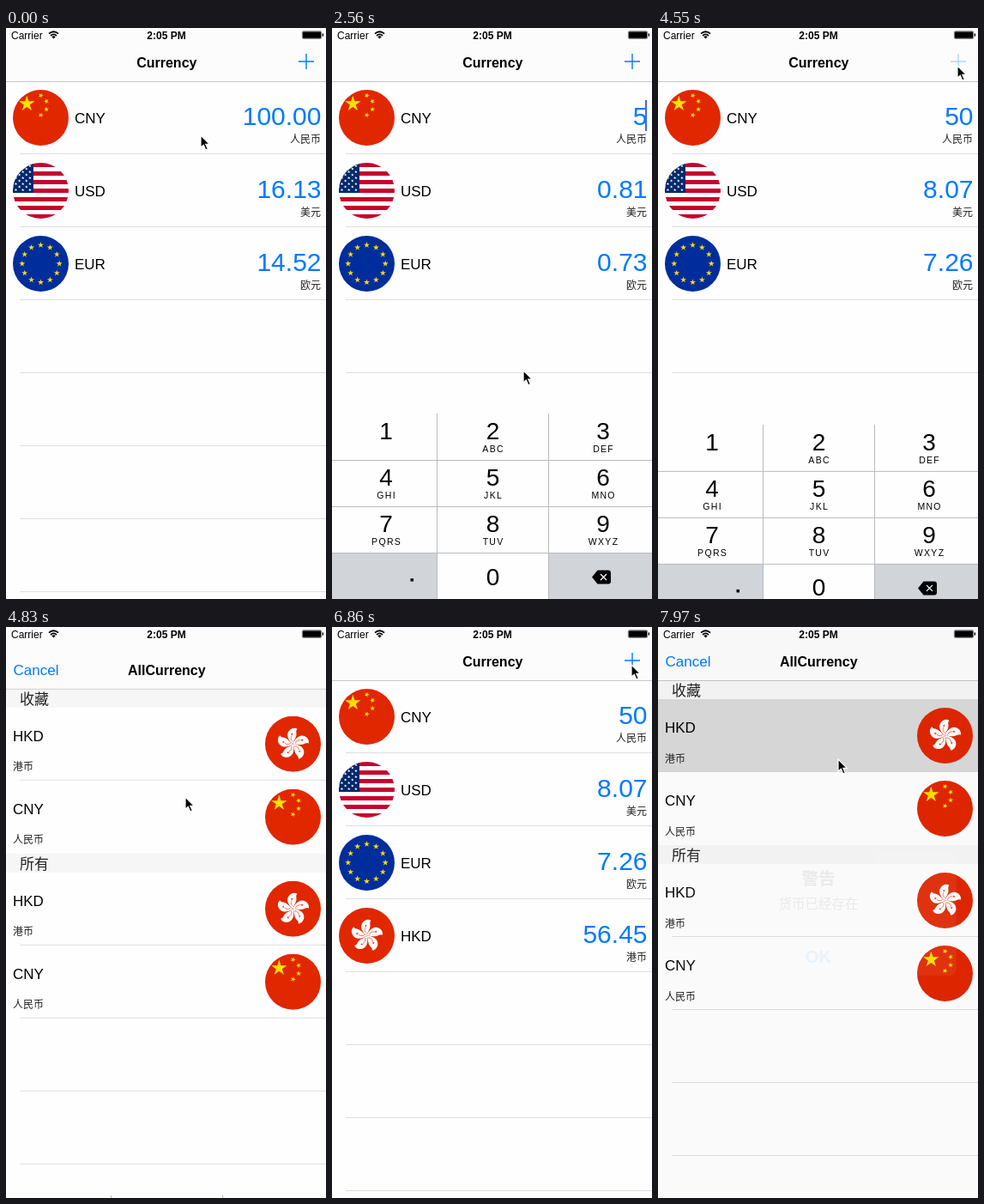
Write an HTML page that moves like this. It is 373 px wide and 665 px high and loops after 8 s.

```html
<!DOCTYPE html>
<html lang="zh-CN">
<head>
<meta charset="utf-8">
<title>Currency</title>
<style>
html, body { margin: 0; width: 100%; height: 100%; overflow: hidden; background: #fefefe; }
svg { display: block; width: 373px; height: 665px; }
text { font-family: "Liberation Sans", "Noto Sans CJK SC", "Noto Sans CJK", sans-serif; }
</style>
</head>
<body>
<svg id="stage" viewBox="0 0 373 665" xmlns="http://www.w3.org/2000/svg"></svg>
<script>
const LOOP = 8000, W = 373, H = 665;
const ROW = 85, NAV = 62, KEY = 54, KEYS = 4 * KEY, KEY_TOP = H - KEYS;
const BLUE = "#007aff", RED = "#e12700", GOLD = "#ffde00", GREY = "#d1d4d9", LINE = "#b9bbbf";

// --- markup helpers ---
const rect = (x, y, w, h, fill, more = "") =>
  `<rect x="${x}" y="${y}" width="${w}" height="${h}" fill="${fill}" ${more}/>`;
const text = (s, x, y, size, fill = "#000", more = "") =>
  `<text x="${x}" y="${y}" font-size="${size}" fill="${fill}" ${more}>${s}</text>`;
const group = (id, body) => `<g id="${id}">${body}</g>`;
const MID = ' text-anchor="middle"', END = ' text-anchor="end"', BOLD = ' font-weight="700"';
const each = (n, make) => Array.from({ length: n }, (_, i) => make(i)).join("");
const polar = (x, y, r, deg) => [x + r * Math.sin(deg * Math.PI / 180), y - r * Math.cos(deg * Math.PI / 180)];

function star(x, y, r, fill, turn = 0) {
  const pts = each(10, i => polar(x, y, i % 2 ? r * 0.382 : r, turn + i * 36).map(v => v.toFixed(2)) + " ");
  return `<polygon points="${pts}" fill="${fill}"/>`;
}

// --- flags, each in a 65 px box ---
const field = fill => rect(0, 0, 65, 65, fill);

const china = () => field(RED) + star(16.3, 16.3, 9.6, GOLD) + each(4, i => {
  const [x, y] = polar(27.5, 18, 12.5, 24 + i * 44);
  return star(x, y, 3.2, GOLD, Math.atan2(16.3 - x, y - 16.3) * 180 / Math.PI);
});

const usa = () => field("#fff") + each(7, i => rect(0, i * 10, 65, 5, "#c4052f")) +
  rect(0, 0, 24, 35, "#00286b") +
  each(9, row => each(3, k => star(19.9 - (row % 2 + 2 * k) * 4.1, 3.5 * (row + 1), 1.9, "#fff")));

const europe = () => field("#002d9c") +
  each(12, i => star(...polar(32.5, 32.5, 21.7, i * 30), 3.7, GOLD));

const hongKong = () => field(RED) + each(5, i =>
  `<g transform="translate(32.5 32.5) rotate(${i * 72})">
    <path d="M0 0C-4-3-7.500-8-6-13C-4-18.500 2-20 5-17.500C3-16 4-14 4-11.500C4-7 1-5 0 0Z" fill="#fff"/>
    <path d="M0-3C-2.500-5-2.800-7-1.500-10" fill="none" stroke="${RED}" stroke-width=".6"/>
    ${star(-1.2, -11.5, 1.6, RED)}</g>`);

const flags = { CNY: china(), USD: usa(), EUR: europe(), HKD: hongKong() };
const names = { CNY: "人民币", USD: "美元", EUR: "欧元", HKD: "港币" };
const flag = (code, x, y) => `<use href="#${code}" x="${x}" y="${y}"/>`;
const rule = y => rect(16, y, W - 16, 1, "#dedede");

const navBar = title => rect(0, 0, W, NAV, "#fcfcfc") + rect(0, NAV, W, 1, "#c6c6c6") +
  text(title, 187.3, 46, 16, "#000", MID + BOLD);

// --- screens ---
const mainRow = (code, i) => {
  const y = NAV + i * ROW;
  return group("row" + i, flag(code, 8, y + 10) + text(code, 80, y + 49, 17) +
    text("", 367.5, y + 50.5, 30, BLUE, `${END} id="val${i}"`) +
    text(names[code], 367, y + 72, 12, "#222", END));
};

const mainScreen = () => rect(0, 0, W, H, "#fefefe") + navBar("Currency") +
  `<path id="plus" d="M341 39H359M350 30V48" stroke="${BLUE}" stroke-width="1.4"/>` +
  each(7, i => rule(NAV + ROW * (i + 1) - 1)) +
  Object.keys(flags).map(mainRow).join("") +
  rect(365, 84, 2, 36, "#3f66ee", 'id="caret"');

const section = (label, y, h) => rect(0, y, W, h, "#f6f6f6") + text(label, 16, y + h - 4, 17, "#222");
const pickRows = y => ["HKD", "CNY"].map((code, i) => {
  const top = y + i * ROW;
  return text(code, 8, top + 39, 17) + text(names[code], 8, top + 73.5, 12, "#222") + flag(code, 302, top + 10);
}).join("");

const picker = () => rect(0, 0, W, H, "#fefefe") + navBar("AllCurrency") +
  text("Cancel", 8.5, 46, 17, BLUE) + section("收藏", 63, 21) + section("所有", 254, 22) +
  rule(168) + each(4, i => rule(360 + i * ROW)) +
  rect(0, 84, W, ROW, "#d9d9d9", 'id="picked"') + pickRows(84) + pickRows(276);

const letters = ["", "ABC", "DEF", "GHI", "JKL", "MNO", "PQRS", "TUV", "WXYZ"];
const keyX = [63, 187.5, 316];

function digit(abc, i) {
  const x = keyX[i % 3], y = KEY_TOP + Math.floor(i / 3) * KEY;
  return text(i + 1, x, y + 30, 28, "#000", MID) +
    text(abc, x + 0.6, y + 45, 10.5, "#000", MID + ' letter-spacing="1.3"');
}

const keyboard = () => rect(0, KEY_TOP, W, KEYS, "#fefefe") +
  rect(0, H - KEY, 123, KEY, GREY) + rect(253, H - KEY, 120, KEY, GREY) +
  rect(123, KEY_TOP + KEY, 129, KEY, GREY, 'id="key5"') + rect(123, H - KEY, 129, KEY, GREY, 'id="key0"') +
  each(3, i => rect(0, KEY_TOP + KEY * (i + 1), W, 1, LINE)) +
  each(2, i => rect(122 + 130 * i, KEY_TOP, 1, KEYS, LINE)) +
  letters.map(digit).join("") + text("0", 187.5, 648.5, 28, "#000", MID) + rect(91.5, 641, 3.5, 3.5, "#000") +
  `<path d="M303 639.500L309.500 631.500H322Q325 631.500 325 634.500V644.500Q325 647.500 322 647.500H309.500Z"/>
   <path d="M313 636L320 643M320 636L313 643" stroke="#fff" stroke-width="1.3"/>`;

const statusBar = () => text("Carrier", 6, 12.5, 12) + text("2:05 PM", 187, 12.5, 12, "#000", MID + BOLD) +
  `<path d="M50 6.700Q55.500 1.800 61 6.700M52 9Q55.500 5.800 59 9" fill="none" stroke="#000" stroke-width="1.7"/>
   <path d="M53.300 10.300Q55.500 8.300 57.700 10.300L55.500 12.600Z"/>` +
  rect(345.3, 3.8, 22.4, 8.6, "#bbb", 'rx="1.5" stroke="#333" stroke-width=".6"') +
  rect(346, 4.5, 21, 7.2, "#000", 'rx=".8"') + rect(368.7, 6.3, 1.3, 3.4, "#000", 'rx=".6"');

const alertBox = () => rect(0, 0, W, H, "#000", 'opacity=".016"') +
  `<g opacity=".06" transform="translate(187 333.500) scale(1.19)">` +
  rect(-135, -61, 270, 122, "#fafafa", 'rx="7"') +
  text("警告", 0, -28, 16.5, "#000", MID + BOLD) + text("货币已经存在", 0, -4.5, 13, "#000", MID) +
  text("OK", 0, 48, 17, BLUE, MID + BOLD) + "</g>";

document.getElementById("stage").innerHTML =
  `<defs><clipPath id="disc"><circle cx="32.5" cy="32.5" r="32.5"/></clipPath>` +
  Object.keys(flags).map(c => `<g id="${c}" clip-path="url(#disc)">${flags[c]}</g>`).join("") + "</defs>" +
  mainScreen() + group("picker", picker()) + group("alert", alertBox()) +
  group("keyboard", keyboard()) + statusBar() +
  group("pointer", `<path d="M0 0V14.200L3.300 11.200L5.800 17L8.300 15.900L5.800 10.300H10.200Z" stroke="#fff" stroke-width="1.2"/>`);

const el = id => document.getElementById(id);
const show = (id, on) => el(id).setAttribute("visibility", on ? "visible" : "hidden");
const place = (id, x, y) => el(id).setAttribute("transform", `translate(${x.toFixed(2)} ${y.toFixed(2)})`);

// --- timing ---
const OPEN_KEYS = 180, TYPE_5 = 1330, TYPE_0 = 3370;
const OPEN_1 = 4532, PICK_1 = 5861.5, OPEN_2 = 7100, PICK_2 = 7940, ALERT = 7970;

// critically damped, 0 to 1
const spring = ms => {
  const k = Math.max(0, ms) * 0.0207;
  return 1 - (1 + k) * Math.exp(-k);
};
const clamp = v => Math.min(1, Math.max(0, v));
const smooth = p => p * p * (3 - 2 * p);
const during = (t, a, b) => t >= a && t < b;

// pointer moves: leave, arrive, x, y
const moves = [
  [560, 1120, 199, 519], [1590, 1720, 252, 267], [1900, 2250, 233, 343], [2390, 3000, 181, 634],
  [3480, 3770, 349, 174], [3790, 4080, 349, 44], [4590, 4820, 209, 198], [5000, 5380, 171, 145],
  [6000, 6600, 349, 44], [7260, 7730, 210, 154]
];
const pointerAt = t => moves.reduce(([x, y], [from, to, nx, ny]) => {
  const p = smooth(clamp((t - from) / (to - from)));
  return [x + (nx - x) * p, y + (ny - y) * p];
}, [227, 125]);

// blinks every 860 ms, restarting with each typed digit
function caretAt(t) {
  if (!during(t, 300, OPEN_1)) return 0;
  const age = Math.max(0, t - (t < TYPE_5 ? 645 : t < TYPE_0 ? TYPE_5 : TYPE_0));
  const fromDark = Math.abs((age + 550) % 860 - 430);
  return clamp((fromDark - 80) / 100);
}

function amounts(t) {
  const typed = t < TYPE_5 ? 100 : t < TYPE_0 ? 5 : 50;
  const rates = [0.1613, 0.1452, 1.129];
  return [typed === 100 ? "100.00" : typed, ...rates.map(r => (typed * r + 1e-6).toFixed(2))];
}

const pickerY = t => t < PICK_1 ? H * (1 - spring(t - OPEN_1))
  : H * (spring(t - PICK_1) - spring(t - OPEN_2));

function draw(t) {
  amounts(t).forEach((v, i) => { el("val" + i).textContent = v; });
  el("val0").setAttribute("fill", during(t, OPEN_KEYS, TYPE_5) ? "#c7c7cd" : BLUE);
  show("row3", t >= PICK_1);
  el("caret").setAttribute("opacity", caretAt(t));
  el("plus").setAttribute("opacity", during(t, 4470, 4600) || during(t, 7070, 7200) ? 0.3 : 1);

  place("picker", 0, pickerY(t));
  show("picked", during(t, PICK_1, 6700) || t >= PICK_2);
  show("alert", t >= ALERT);

  place("keyboard", 0, KEYS * (1 - spring(t - OPEN_KEYS) + spring(t - OPEN_1)));
  show("key5", during(t, 1300, 1440));
  show("key0", during(t, 3310, 3470));
  place("pointer", ...pointerAt(t));
}

const start = performance.now();
function tick() {
  draw((performance.now() - start) % LOOP);
  requestAnimationFrame(tick);
}
tick();
</script>
</body>
</html>
```
